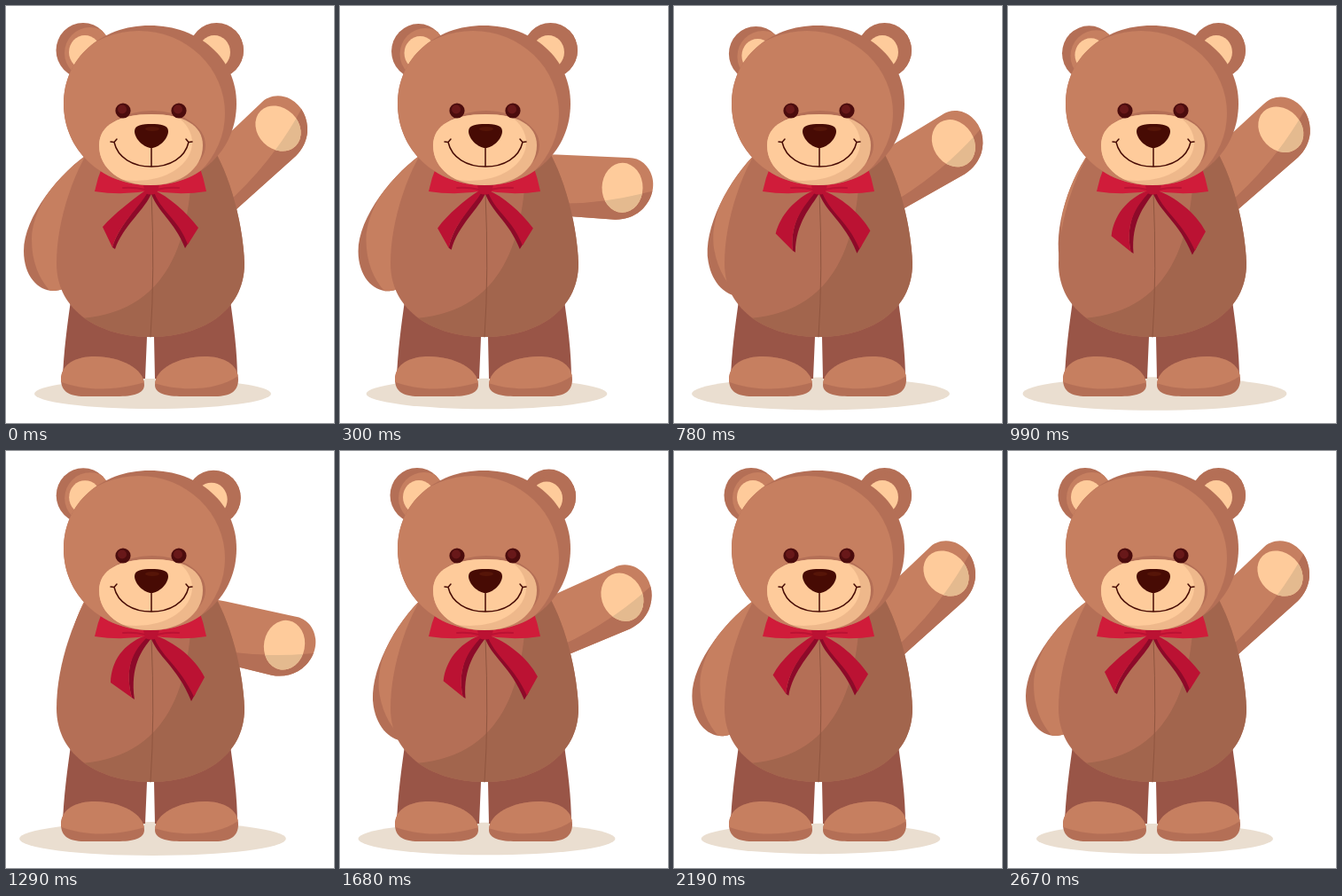
An HTML page with a canvas that plays this animation: 370x470 px, repeating every 3600 ms.

```html
<!DOCTYPE html>
<html>
<head>
<meta charset="utf-8">
<title>Waving bear</title>
<style>
html, body { margin: 0; width: 100%; height: 100%; overflow: hidden; background: #fff; }
canvas { display: block; }
</style>
</head>
<body>
<canvas id="stage" width="370" height="470"></canvas>
<script>
const ctx = document.getElementById('stage').getContext('2d');
const LOOP = 3600, MOVE_END = 2670, STEP = 30;
const C = {
  light: '#c67f60', mid: '#b46f56', dark: '#a2654d', leg: '#995547', seam: '#8f553f',
  cream: '#fecb9b', creamShade: '#eeb88b', padShade: '#e4ba8f', ink: '#470b04',
  bow: '#d01c3a', tail: '#bb1233', fold: '#8d0a29', ground: '#eaded0'
};

// Easing
const clamp = x => Math.max(0, Math.min(1, x));
const sine = x => (1 - Math.cos(Math.PI * clamp(x))) / 2;
const smooth = x => x * x * x * (10 + x * (6 * x - 15));
const bump = (t, start, peak, end) =>
  t < peak ? sine((t - start) / (peak - start)) : sine((end - t) / (end - peak));
const mix = (a, b, k) => a + (b - a) * k;

function waveAngle(t) {
  const period = 933;
  if (t >= 2 * period) return 0;
  const x = (t % period) / (period / 2);
  return 61 * smooth(x < 1 ? x : 2 - x);
}
const tuckAngle = t => -29 * Math.exp(-(((t - 1225) / 310) ** 2) / 2);

// Drawing helpers
const path = d => new Path2D(d);
function oval(x, y, rx, ry = rx, turn = 0) {
  const p = new Path2D();
  p.ellipse(x, y, rx, ry, turn * Math.PI / 180, 0, 2 * Math.PI);
  return p;
}
function fill(p, color) {
  ctx.fillStyle = color;
  ctx.fill(p);
}
function line(p, color, width) {
  ctx.strokeStyle = color;
  ctx.lineWidth = width;
  ctx.lineCap = ctx.lineJoin = 'round';
  ctx.stroke(p);
}
// Paints a shape, then a second tone kept inside it
function twoTone(shape, base, inner, tone) {
  fill(shape, base);
  ctx.save();
  ctx.clip(shape);
  fill(inner, tone);
  ctx.restore();
}
function turned(x, y, degrees, draw) {
  ctx.save();
  ctx.translate(x, y);
  ctx.rotate(degrees * Math.PI / 180);
  ctx.translate(-x, -y);
  draw();
  ctx.restore();
}

const shapes = {
  legs: path('M74 325 C69 360 65 390 64 420 L157 420 L159 373 L167 373 L168 420 L261 420 C261 390 257 360 252 325 Z'),
  body: path('M105 145 C78 180 57 240 57 290 C57 345 107 373 163 373 C219 373 269 345 269 290 C267 240 250 180 224 145 Z'),
  bodyShade: path('M210 140 C212 240 198 343 85 352 L100 400 L300 400 L300 140 Z'),
  seam: path('M164 210 Q168 300 163 373'),
  footL: path('M62 421 C62 403 80 395 100 395 C129 395 156 409 156 427 C156 437 143 440 125 440 L88 440 C71 440 62 434 62 421 Z'),
  footLLight: path('M60 423 C85 432 115 436 157 424 L157 390 L60 390 Z'),
  footR: path('M262 421 C262 403 244 395 224 395 C195 395 168 409 168 427 C168 437 181 440 199 440 L236 440 C253 440 262 434 262 421 Z'),
  footRLight: path('M167 425 C195 435 240 434 263 416 L263 390 L167 390 Z'),
  armL: path('M98 163 C60 187 20 238 20 276 C20 305 37 322 55 321 C68 320 80 312 90 295 L115 190 Z'),
  armLLight: path('M100 160 C55 187 29 232 29 263 C29 290 38 309 52 324 L100 324 L120 180 Z'),
  armR: path('M214 180 L229 165 L287 110 C296 100 310 99 321 105 C334 112 341 127 340 142 C339 152 335 161 327 169 L260 229 L225 225 Z'),
  armRShade: path('M245 226 Q300 178 335 113 L360 140 L265 245 Z'),
  pad: oval(307, 138, 23, 28, -45),
  head: path('M65 110 C65 59 107 22 162 22 C218 22 260 59 260 110 C260 162 219 202 163 202 C107 202 65 162 65 110 Z'),
  headLight: oval(150, 121, 97, 93),
  muzzleRim: oval(165, 157, 60, 39),
  muzzle: path('M105 157 C105 134 128 122 164 122 C200 122 222 134 222 157 C222 184 196 202 163 202 C130 202 105 184 105 157 Z'),
  muzzleLight: oval(147, 154, 63, 43),
  nose: path('M145 141 C145 134 154 133 164 133 C174 133 183 134 183 141 C183 150 172 160 164 160 C156 160 145 150 145 141 Z'),
  mouth: path('M164 159 V181 M118 153 L122 153.5 L125 150 M210 153 L206 153.5 L203 150 M122 153.5 C126 171 143 181 164 181 C185 181 202 171 206 153.5'),
  wings: path('M109 180 Q103 194 100 209 Q132 214 163 208 Q195 214 226 209 Q223 194 218 180 L190 195 L135 195 Z'),
  wingFolds: path('M157 207 Q145 204 132 205 M170 207 Q182 204 195 205'),
  knot: path('M155 202 Q164 199 173 202 L170 211 Q164 214 157 211 Z')
};

function ear(x, y, padX, padY, dx, dy, light) {
  ctx.save();
  ctx.translate(dx, dy);
  twoTone(oval(x, y, 30.5, 31), C.mid, oval(x + 8, y + 3, 29), light);
  fill(oval(padX, padY, 18, 19), C.cream);
  ctx.restore();
}

// k runs from hanging (0) to swung right (1)
function ribbonTails(k) {
  const m = (a, b) => mix(a, b, k);
  const lx = m(109, 118), ly = m(249, 261), tx = m(123, 145), ty = m(274, 280);
  const inner = `C${m(150, 147)} ${m(228, 222)} ${m(128, 132)} ${m(245, 240)} ${tx - 3} ${ty - 2}`;
  const outer = `C${m(132, 140)} ${m(248, 242)} ${m(158, 153)} ${m(228, 225)} 164 211`;
  fill(path(`M157 208 ${inner} L${tx} ${ty} ${outer} Z`), C.fold);
  fill(path(`M157 208 C${m(143, 132)} 218 ${m(122, 119)} ${m(234, 236)} ${lx} ${ly} L${tx - 3} ${ty - 2} L${tx - 3} ${ty - 2} C${m(128, 132)} ${m(245, 240)} ${m(150, 147)} ${m(228, 222)} 161 208 Z`), C.tail);

  const rx = m(217, 224), ry = m(250, 255), bx = m(202, 209), by = m(273, 282);
  fill(path(`M163 209 C170 232 ${m(190, 193)} 242 ${bx} ${by} L${m(207, 214)} ${m(265, 273)} C198 238 179 228 167 207 Z`), C.fold);
  fill(path(`M166 207 C${m(184, 190)} 215 ${m(203, 214)} ${m(232, 234)} ${rx} ${ry} L${m(205, 212)} ${m(269, 277)} C195 240 174 232 166 207 Z`), C.tail);
}

function face() {
  twoTone(shapes.head, C.mid, shapes.headLight, C.light);
  fill(shapes.muzzleRim, C.mid);
  twoTone(shapes.muzzle, C.creamShade, shapes.muzzleLight, C.cream);
  for (const x of [132, 195]) {
    fill(oval(x, 118, 8.6), '#4b0c0d');
    fill(oval(x - 1, 116.5, 5), '#681819');
  }
  line(shapes.mouth, C.ink, 1.5);
  fill(shapes.nose, C.ink);
  fill(oval(165, 138.5, 8, 2.5), '#561508');
}

function draw(t) {
  ctx.fillStyle = '#fff';
  ctx.fillRect(0, 0, 370, 470);

  const spread = bump(t, 0, 1230, 2400);
  fill(oval(165.5, 437, 133.5 + 17 * spread, 17 + 2 * spread), C.ground);
  fill(shapes.legs, C.leg);
  twoTone(shapes.footL, C.mid, shapes.footLLight, C.light);
  twoTone(shapes.footR, C.mid, shapes.footRLight, C.light);

  turned(99, 179, tuckAngle(t), () => twoTone(shapes.armL, C.mid, shapes.armLLight, C.light));
  turned(234, 185, waveAngle(t), () => {
    twoTone(shapes.armR, C.light, shapes.armRShade, C.mid);
    twoTone(shapes.pad, C.cream, shapes.armRShade, C.padShade);
  });

  twoTone(shapes.body, C.mid, shapes.bodyShade, C.dark);
  line(shapes.seam, C.seam, 1);

  ribbonTails(Math.sin(Math.PI * t / MOVE_END) ** 2);
  fill(shapes.wings, C.bow);
  line(shapes.wingFolds, C.tail, 2);
  fill(shapes.knot, C.tail);

  const left = bump(t, 0, 850, 1350), right = bump(t, 960, 1380, 2000);
  ear(87, 50, 89, 52, 5.5 * left, 4 * left, C.light);
  ear(237.5, 50, 235, 52, -3.7 * right, 3 * right, C.mid);
  face();
}

const began = performance.now();
function tick() {
  const t = (performance.now() - began) % LOOP;
  draw(Math.min(Math.floor(t / STEP) * STEP, MOVE_END));
  requestAnimationFrame(tick);
}
tick();
</script>
</body>
</html>
```
